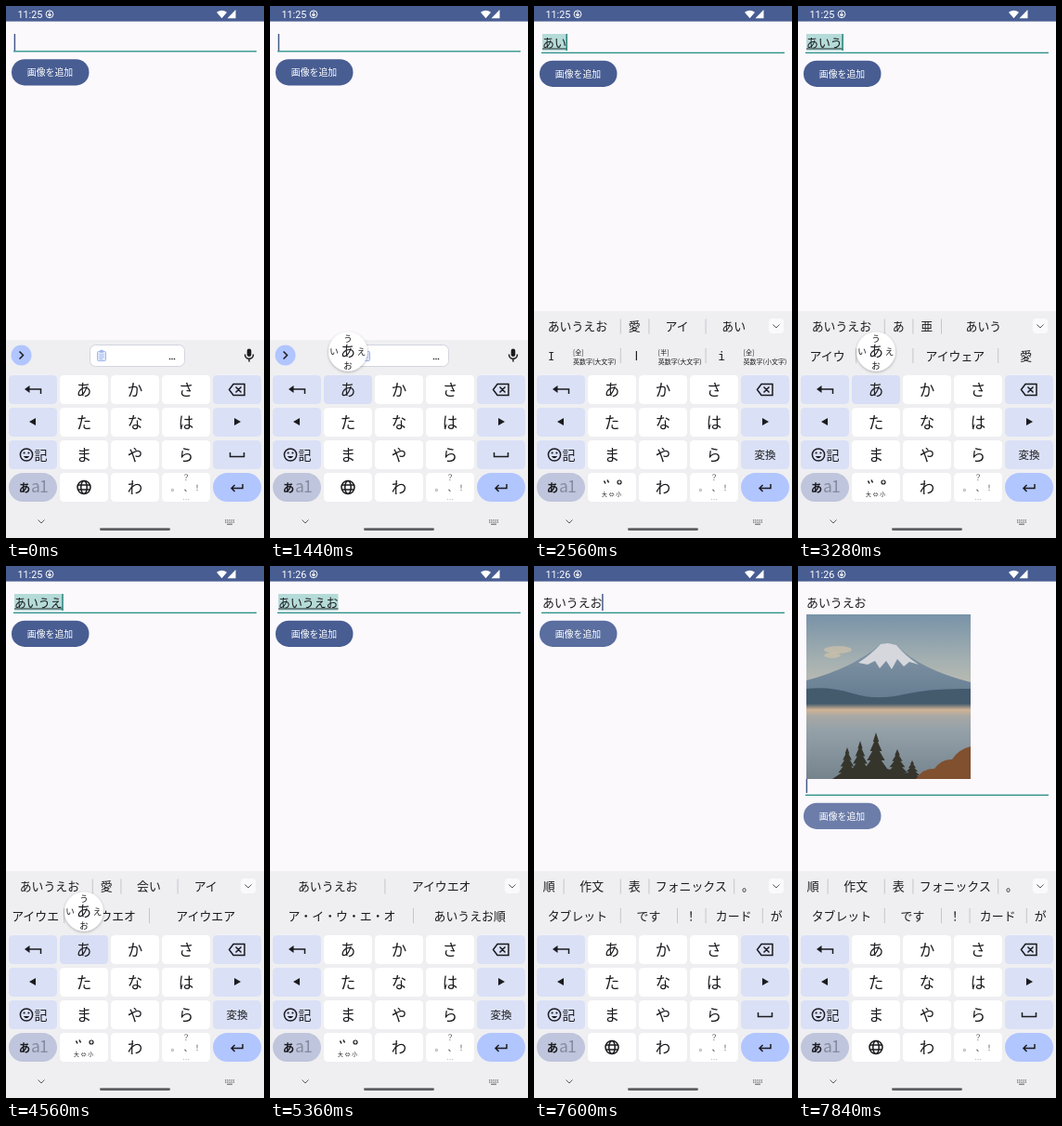
Recreate the animation shown at these times as an HTML page. Size 278 by 572 pixels, loop 8000 ms.

```html
<!DOCTYPE html>
<html lang="ja">
<head>
<meta charset="utf-8">
<style>
html, body { margin: 0; width: 100%; height: 100%; overflow: hidden; background: #fcf9fd; }
svg { display: block; width: 100vw; height: 100vh; }
text { font-family: "Noto Sans CJK JP", "Noto Sans CJK", sans-serif; fill: #1b1b1f; white-space: pre; }
.clock { font-family: Roboto, sans-serif; }
.mono { font-family: "Noto Sans Mono", monospace; }
.line { fill: none; stroke: #1b1b1f; stroke-width: 1.5; }
.thin { fill: none; stroke: #5c5d62; stroke-width: 1; }
</style>
</head>
<body>
<svg id="stage" viewBox="0 0 278 572" preserveAspectRatio="none"></svg>
<script>
const LOOP = 8000, EM = 12.9, UNIT = 30.6;
const COLS = [3, 58, 113, 168, 223], ROWS = [397, 432, 467, 502];
const BLUE = '#485d92', SOFT = '#dae0f6', ACCENT = '#b1c5ff';

// Suggestion rows: [word, width in units, note, class]
const WORDS = {
  'あ': [[['あいうえお', 3], ['ある', 2], ['あ', 1], ['あり', 2]],
    [['亜', 1], ['ア', 1], ['ぁ', 2, '小書き'], ['ァ', 2, '小書き'], ['1', 1], ['１', 2, '[全]']]],
  'あい': [[['あいうえお', 3], ['愛', 1], ['アイ', 2], ['あい', 2]],
    [['I', 3, '[全]\n英数字(大文字)', 'mono'], ['I', 3, '[半]\n英数字(大文字)'], ['i', 3, '[全]\n英数字(小文字)', 'mono']]],
  'あいう': [[['あいうえお', 3], ['あ', 1], ['亜', 1], ['あいう', 3]],
    [['アイウ', 2], ['相', 2], ['アイウェア', 3], ['愛', 2]]],
  'あいうえ': [[['あいうえお', 3], ['愛', 1], ['会い', 2], ['アイ', 2]],
    [['アイウエ', 2], ['アイウエオ', 3], ['アイウエア', 4]]],
  'あいうえお': [[['あいうえお', 4], ['アイウエオ', 4]],
    [['ア・イ・ウ・エ・オ', 5], ['あいうえお順', 4]]],
  next: [[['順', 1], ['作文', 2], ['表', 1], ['フォニックス', 3], ['。', 1]],
    [['タブレット', 3], ['です', 2], ['！', 1], ['カード', 2], ['が', 1]]]
};

// Each step changes part of the state at its time
const STEPS = [
  [0, { clock: '11:25', text: '', composing: false, caret: true, words: '', press: '', flick: '', photo: false, ripple: 0 }],
  [240, { caret: false }], [720, { caret: true }], [1120, { caret: false }],
  [1440, { caret: true, press: 'a' }],
  [1680, { press: '', text: 'あ', composing: true, words: 'あ' }],
  [2160, { press: 'a' }], [2320, { flick: 'い' }],
  [2480, { press: '', flick: '', text: 'あい' }], [2560, { words: 'あい' }],
  [2720, { press: 'a' }], [2880, { flick: 'う' }],
  [3040, { press: '', flick: '', text: 'あいう' }], [3120, { words: 'あいう' }],
  [3280, { press: 'a' }], [3520, { flick: 'え' }],
  [3760, { press: '', flick: '' }], [4160, { text: 'あいうえ' }], [4240, { words: 'あいうえ' }],
  [4480, { press: 'a' }], [4640, { flick: 'お' }],
  [4880, { press: '', flick: '', text: 'あいうえお', clock: '11:26' }], [5040, { words: 'あいうえお' }],
  [5360, { caret: false }], [5920, { caret: true }],
  [6080, { press: 'enter' }], [6160, { press: '' }],
  [6240, { composing: false, words: 'next' }],
  [6640, { caret: false }], [7040, { caret: true }],
  [7600, { ripple: 1 }], [7680, { ripple: 2 }], [7840, { photo: true }]
];

const rect = (x, y, w, h, fill, r = 0, more = '') =>
  `<rect x="${x}" y="${y}" width="${w}" height="${h}" rx="${r}" fill="${fill}" ${more}/>`;
const path = (d, more = 'class="line"') => `<path d="${d}" ${more}/>`;
const circle = (x, y, r, more) => `<circle cx="${x}" cy="${y}" r="${r}" ${more}/>`;
const write = (s, x, y, size, more = '') => `<text x="${x}" y="${y}" font-size="${size}" ${more}>${s}</text>`;
const label = (s, x, y, size, more = '') => write(s, x, y + size * .37, size, `text-anchor="middle" ${more}`);

const DEFS = `<defs>
  <linearGradient id="sky" x2="0" y2="1"><stop stop-color="#7893a8"/><stop offset=".5" stop-color="#a5b0b1"/><stop offset="1" stop-color="#cfc6b2"/></linearGradient>
  <linearGradient id="slope" x2="0" y2="1"><stop stop-color="#8496a7"/><stop offset="1" stop-color="#5f788d"/></linearGradient>
  <linearGradient id="lake" x2="0" y2="1"><stop stop-color="#b3aca2"/><stop offset=".3" stop-color="#94a1a9"/><stop offset="1" stop-color="#75838d"/></linearGradient>
  <linearGradient id="mist" x2="0" y2="1"><stop stop-color="#cfb295" stop-opacity="0"/><stop offset=".5" stop-color="#cfb295"/><stop offset="1" stop-color="#cfb295" stop-opacity="0"/></linearGradient>
  <filter id="shade" x="-30%" y="-30%" width="160%" height="160%"><feDropShadow dx="0" dy="1" stdDeviation="1.5" flood-opacity=".3"/></filter>
  <clipPath id="frame"><rect width="177" height="177"/></clipPath>
</defs>`;

function tree(x, top, half) {
  const step = (177 - top) / 5;
  let left = '', right = '';
  for (let i = 1; i <= 5; i++) {
    const y = top + i * step, wide = half * i / 5;
    right += `L${x + wide} ${y}L${x + wide * .6} ${y}`;
    left = `L${x - wide * .6} ${y}L${x - wide} ${y}` + left;
  }
  return path(`M${x} ${top}${right}${left}Z`, 'fill="#35352c"');
}

function photo() {
  const cloud = (x, y, rx, ry) => `<ellipse cx="${x}" cy="${y}" rx="${rx}" ry="${ry}" fill="#d9c6a8" opacity=".6"/>`;
  return `<g transform="translate(9 52)" clip-path="url(#frame)">`
    + rect(0, 0, 177, 100, 'url(#sky)') + cloud(34, 38, 15, 4) + cloud(28, 44, 9, 3)
    + path('M0 71Q50 58 80 32L88 31L97 33Q122 59 177 73V104H0Z', 'fill="url(#slope)"')
    + path('M56 52Q70 43 80 32L88 31L97 33Q107 45 121 54L111 51L105 56L98 48L92 59L86 50L79 58L74 50L66 54Z', 'fill="#d5d7dc"')
    + path('M0 80Q25 77 50 85T105 86T177 80V103H0Z', 'fill="#435b6d"')
    + rect(0, 102, 177, 75, 'url(#lake)') + rect(0, 96, 177, 13, 'url(#mist)')
    + path('M28 177Q50 160 75 164T132 177Z', 'fill="#35352c"')
    + tree(44, 143, 12) + tree(58, 136, 13) + tree(75, 127, 16) + tree(98, 145, 14) + tree(114, 157, 10)
    + path('M118 177Q126 165 138 166Q146 155 157 156Q164 145 177 142V177Z', 'fill="#80502f"') + '</g>';
}

function statusBar(clock) {
  const white = 'fill="#fff"';
  return rect(0, 0, 278, 16.6, BLUE) + write(clock, 12.4, 13, 10.8, `class="clock" style="fill:#fff"`)
    + circle(47, 8.8, 3.9, 'fill="none" stroke="#fff"')
    + path('M47 6.3V10M45.2 8.8L47 10.7L48.8 8.8', 'fill="none" stroke="#fff" stroke-width="1.1"')
    + path('M227 6.8Q232.5 2.6 238 6.8L232.5 13.2Z', white) + path('M238.5 13.2L247.5 4V13.2Z', white);
}

function editor(s) {
  const shift = s.photo ? 196 : s.text ? 0 : -1.5;
  const width = s.text.length * EM;
  const caretX = s.photo ? 9 : 9 + width, caretY = s.photo ? 229 : 30;
  const fill = [BLUE, '#5a6e9f', '#6c7da9'][s.ripple];
  let out = '';
  if (s.composing) out += rect(9, 30, width, 18, '#b4dbd8');
  out += write(s.text, 9, 43.8, EM);
  if (s.composing) out += rect(9, 45.5, width, .9, '#1b1b1f');
  if (s.photo) out += photo();
  if (s.caret) out += rect(caretX - .3, caretY, 1.4, s.photo ? 15 : 18, s.composing ? '#17786f' : '#3d5286');
  return out + rect(8, 49.7 + shift, 262, 1.2, '#15847c')
    + rect(6, 58.7 + shift, 83.5, 28.3, fill, 14.1)
    + label('画像を追加', 47.5, 73 + shift, 9.9, 'font-weight="500" style="fill:#fff"');
}

function toolbar() {
  return circle(16.5, 375.5, 11, `fill="${ACCENT}"`) + path('M14.5 371.5L18.5 375.5L14.5 379.5')
    + rect(90.5, 364.5, 102, 23, '#fff', 6, 'stroke="#d2d4df"')
    + rect(98.5, 371.5, 9, 10, '#dfe7ff', 1, 'stroke="#9fb5ec"')
    + rect(101, 369.8, 4, 3, '#9fb5ec', 1) + path('M100.5 375H105.5M100.5 377.3H105.5M100.5 379.5H104', 'stroke="#9fb5ec" stroke-width=".9"')
    + [176.5, 179, 181.5].map(x => circle(x, 379.5, .8, 'fill="#1b1b1f"')).join('')
    + rect(259.7, 368.5, 4.6, 8.5, '#1b1b1f', 2.3) + path('M257.5 374.5A4.5 4.8 0 0 0 266.5 374.5M262 379V382.5');
}

function cells(row, y) {
  let x = 1, out = '';
  row.forEach(([word, units, note, cls], i) => {
    const w = units * UNIT, lines = note ? note.split('\n') : [];
    const style = cls ? `class="${cls}"` : '';
    if (i) out += rect(x, y - 8, 1, 16, '#c4c5cb');
    out += label(word, note ? x + 17.5 : x + w / 2, y, EM, style);
    if (lines.length === 2) lines.forEach((s, n) => out += write(s, x + 41, y - 1 + n * 10.3, 7));
    else if (note) out += write(note, x + w - 3, y + 8.5, 7, 'text-anchor="end"');
    x += w;
  });
  return out;
}

function suggestions(name) {
  const [top, bottom] = WORDS[name];
  return cells(top, 344.5) + cells(bottom, 376) + rect(253, 336, 16, 16, '#fafafd', 4)
    + path('M257.5 342.5L261 346L264.5 342.5', 'class="thin"');
}

function keys(s) {
  const typing = s.composing;
  const letters = ['あかさ', 'たなは', 'まやら', ' わ '];
  let out = '';
  ROWS.forEach((y, r) => COLS.forEach((x, c) => {
    const side = c === 0 || c === 4, pill = side && r === 3;
    let fill = side ? SOFT : '#fff';
    if (pill) fill = c ? (s.press === 'enter' ? '#98afea' : ACCENT) : '#bfc5dc';
    if (s.press === 'a' && r === 0 && c === 1) fill = '#d7def5';
    out += rect(x, y, 52, 31, fill, pill ? 15.5 : 4.5);
    if (!side) out += label(letters[r][c - 1], x + 26, y + 15.5, 16.5);
  }));

  const solid = 'fill="#1b1b1f"';
  out += path('M24 412H37.5V417') + path('M20 412L25.5 408V416Z', solid)
    + path('M240.5 412.5L245 406.5H257V418.5H245ZM247.5 409.5L253.5 415.5M253.5 409.5L247.5 415.5')
    + path('M25 447L32 443V451Z', solid) + path('M253 447L246 443V451Z', solid);

  out += circle(22, 482.5, 6.6, 'class="line"') + circle(19.6, 480.5, 1.1, solid) + circle(24.4, 480.5, 1.1, solid)
    + path('M18.8 484Q22 488.5 25.2 484Z', solid) + label('記', 37.5, 482.5, 14);
  out += typing ? label('変換', 249, 482.5, 11.5) : path('M241.5 480V484.5H256.5V480');

  out += label('あ', 20, 518, 12.5, 'font-weight="700"')
    + label('a1', 36, 517, 17.5, 'font-weight="300" letter-spacing="-.8" style="fill:#858b9f"');
  if (typing) {
    out += path('M75.5 510.5L77 513.5M79 509.5L80.5 512.5', 'class="line"')
      + circle(92, 512, 2, 'class="line" style="stroke-width:1.2"')
      + label('大⇔小', 84.5, 525, 5.8, 'font-weight="500" letter-spacing="1.8"');
  } else {
    out += circle(84, 517.5, 7, 'class="line"') + path('M77.5 515H90.5M77.5 520H90.5')
      + '<ellipse cx="84" cy="517.5" rx="3.2" ry="7" class="line"/>';
  }
  const faint = 'style="fill:#55565c"';
  out += label('？', 194, 507, 8.5, faint) + label('。', 182, 517.5, 8.5, faint) + label('、', 196, 517.5, 8.5)
    + label('！', 206, 517.5, 8.5, faint) + label('…', 194, 530, 7, faint);
  return out + path('M255 514V518.5H243M246.5 515L243 518.5L246.5 522');
}

function popup(flick) {
  let out = circle(84, 371.5, 21, 'fill="#fff" filter="url(#shade)"');
  if (flick) return out + label(flick, 84, 371.5, 18);
  return out + label('あ', 84, 371.5, 16, 'font-weight="500"') + label('い', 69, 371.5, 9.5)
    + label('う', 84, 357, 9.5) + label('え', 98.5, 371.5, 9.5) + label('お', 84, 386, 9.5);
}

function navigation() {
  let dots = '';
  for (let i = 0; i < 10; i++) dots += rect(236 + i % 5 * 2.2, 552.3 + Math.floor(i / 5) * 2.2, 1.2, 1.2, '#5c5d62');
  return path('M34.5 552.5L38 556L41.5 552.5', 'class="thin"') + dots + rect(238, 556.7, 6, 1, '#5c5d62')
    + rect(101, 561.2, 76, 2.8, '#5f6064', 1.4);
}

function draw(s) {
  const top = s.words ? 328 : 359;
  return DEFS + rect(0, 0, 278, 572, '#fcf9fd') + statusBar(s.clock) + editor(s)
    + rect(0, top, 278, 572 - top, '#efeff2') + (s.words ? suggestions(s.words) : toolbar())
    + keys(s) + (s.press === 'a' ? popup(s.flick) : '') + navigation();
}

const stage = document.getElementById('stage');
const start = performance.now();
let shown = 0;

function tick() {
  const time = (performance.now() - start) % LOOP;
  const passed = STEPS.filter(([at]) => at <= time);
  if (passed.length !== shown) {
    shown = passed.length;
    stage.innerHTML = draw(Object.assign({}, ...passed.map(step => step[1])));
  }
  requestAnimationFrame(tick);
}
tick();
</script>
</body>
</html>
```
